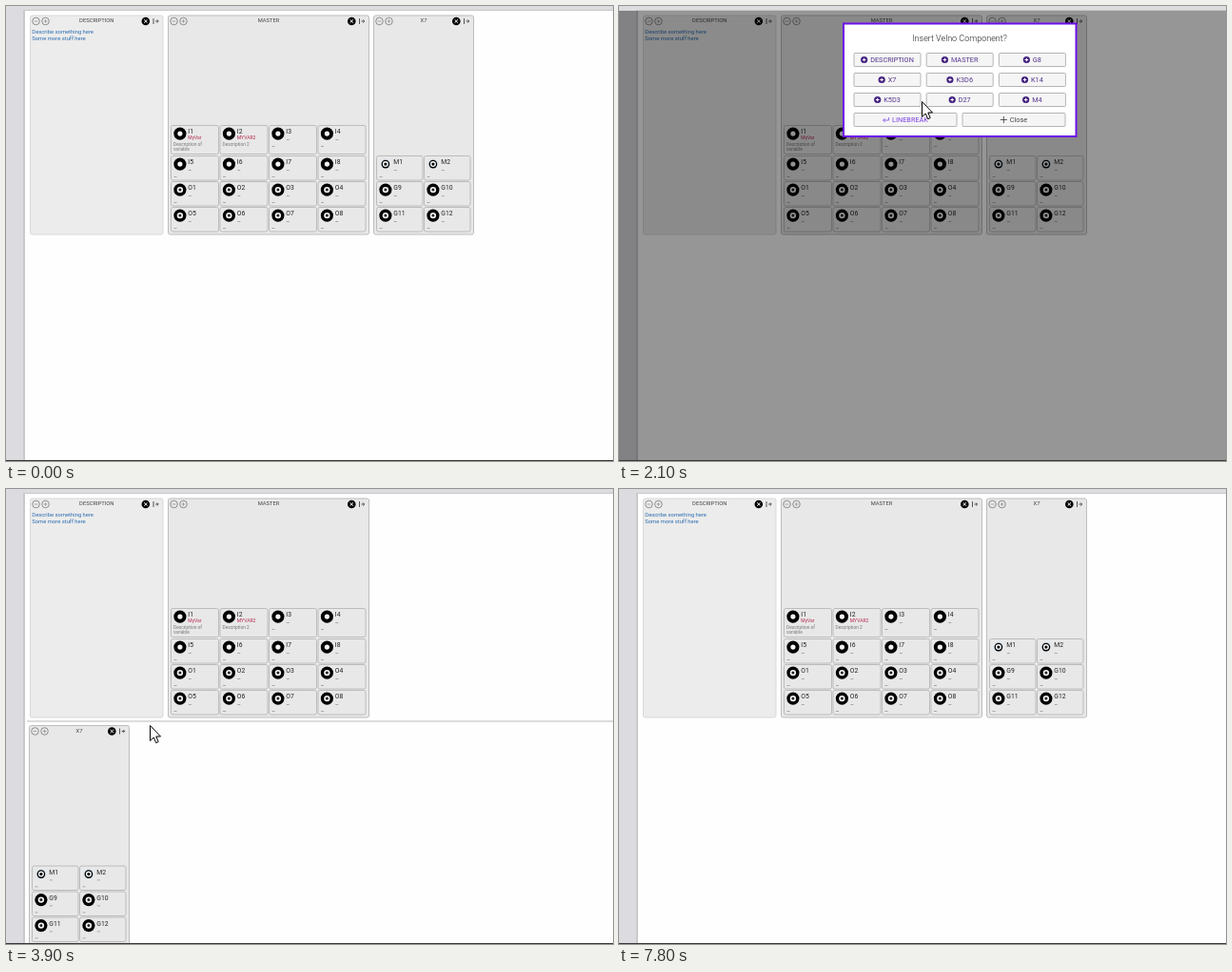
Recreate the animation shown at these times as an HTML page with a canvas. Size 638 px wide and 478 px high, loop 7.9 s.

```html
<!DOCTYPE html>
<html lang="en">
<head>
<meta charset="utf-8">
<title>Module layout editor</title>
<style>
html, body { margin: 0; width: 100%; height: 100%; overflow: hidden; background: #fff; }
canvas { display: block; }
</style>
</head>
<body>
<canvas id="stage" width="638" height="478"></canvas>
<script>
const ctx = document.getElementById('stage').getContext('2d');
const LOOP = 7900, STEP = 100;
const OPEN = 1200, SPLIT = 3200, JOIN = 6400;
const FONT = 'Roboto, "Open Sans", sans-serif';
const clamp = v => Math.max(0, Math.min(1, v));
const easeOut = k => 1 - (1 - k) ** 2;

// Pointer moves, each from where the last one ended
const moves = [
  { start: 100, end: 500, x: 369, y: 16 },
  { start: 600, end: 800, x: 374, y: 17 },
  { start: 1500, end: 2600, x: 304, y: 121 },
  { start: 3400, end: 3900, x: 151, y: 248 },
  { start: 3900, end: 4200, x: 85, y: 313 },
  { start: 4300, end: 5200, x: 417, y: 246 },
  { start: 6650, end: 6900, x: 582, y: 250 },
  { start: 6900, end: 7100, x: 628, y: 183 }
];

function pointerAt(t) {
  if (t < moves[0].start || t > moves[moves.length - 1].end) return null;
  let x = 609, y = 45;
  for (const m of moves) {
    const k = easeOut(clamp((t - m.start) / (m.end - m.start)));
    x += (m.x - x) * k;
    y += (m.y - y) * k;
  }
  return [Math.round(x), Math.round(y)];
}

function rect(x, y, w, h, color) {
  ctx.fillStyle = color;
  ctx.fillRect(x, y, w, h);
}

function box(x, y, w, h, fill, stroke, r = 2, line = 1) {
  ctx.beginPath();
  ctx.roundRect(x + line / 2, y + line / 2, w - line, h - line, r);
  ctx.fillStyle = fill;
  ctx.fill();
  ctx.strokeStyle = stroke;
  ctx.lineWidth = line;
  ctx.stroke();
}

function disc(x, y, r, color) {
  ctx.beginPath();
  ctx.arc(x, y, r, 0, Math.PI * 2);
  ctx.fillStyle = color;
  ctx.fill();
}

function ring(x, y, r, color, width) {
  ctx.beginPath();
  ctx.arc(x, y, r, 0, Math.PI * 2);
  ctx.strokeStyle = color;
  ctx.lineWidth = width;
  ctx.stroke();
}

// Each stroke is a flat list of x, y pairs
function lines(color, width, ...strokes) {
  ctx.beginPath();
  for (const s of strokes)
    for (let i = 0; i < s.length; i += 2) ctx[i ? 'lineTo' : 'moveTo'](s[i], s[i + 1]);
  ctx.strokeStyle = color;
  ctx.lineWidth = width;
  ctx.stroke();
}

function plus(x, y, r, color, width) {
  lines(color, width, [x - r, y, x + r, y], [x, y - r, x, y + r]);
}

function text(str, x, y, size, color, align = 'left', weight = 400) {
  ctx.font = `${weight} ${size}px ${FONT}`;
  ctx.textAlign = align;
  ctx.fillStyle = color;
  ctx.fillText(str, x, y);
}

function panel(x, y, w, title, fill, border) {
  box(x, y, w, 231, fill, border);
  const cy = y + 6.5, right = x + w;
  for (const cx of [x + 6.5, x + 16.5]) ring(cx, cy, 3.8, '#777', .8);
  lines('#888', .7, [x + 4.7, cy, x + 8.3, cy]);
  plus(x + 16.5, cy, 1.8, '#888', .7);
  text(title, x + w / 2, y + 7.6, 5.8, '#444', 'center');
  const cx = right - 18.7, d = 1.7;
  disc(cx, cy, 4.3, '#000');
  lines('#fff', 1, [cx - d, cy - d, cx + d, cy + d], [cx + d, cy - d, cx - d, cy + d]);
  const ax = right - 10.5;
  lines('#444', .9, [ax, cy - 3, ax, cy + 3], [ax + 2, cy, ax + 5, cy],
    [ax + 3.7, cy - 1.6, ax + 5.3, cy, ax + 3.7, cy + 1.6]);
}

function jack(kind, x, y) {
  if (kind === 'M') {
    disc(x, y, 5, '#c9dcec');
    disc(x, y, 4.3, '#000');
    disc(x, y, 3, '#fff');
    disc(x, y, 1.6, '#000');
    return;
  }
  disc(x, y, 6.6, '#000');
  disc(x, y, kind === 'I' ? 2.6 : 3.2, '#f4f4f4');
  if (kind !== 'I') disc(x, y, 1.5, '#222');
}

function cell(x, y, w, h, label, name, notes) {
  box(x, y, w, h, '#e8e8e8', '#bcbcbc');
  jack(label[0], x + 9.9, y + 9.1);
  text(label, x + 18.3, y + 9, 6.8, '#222');
  if (name) {
    text(name, x + 18.3, y + 15, 5, '#b52a50');
    notes.forEach((s, i) => text(s, x + 3, y + 22 + i * 5, 4.8, '#777'));
  } else {
    rect(x + 18.8, y + 15, 3, .8, '#999');
    rect(x + 3.5, y + 22, 3, .8, '#999');
  }
}

const rowY = r => r ? 130 + r * 27 : 125;

function master() {
  panel(170, 9.5, 212, 'MASTER', '#e8e8e8', '#bdbdbd');
  const named = { I1: ['MyVar', ['Description of', 'variable']], I2: ['MYVAR2', ['Description 2']] };
  for (let i = 0; i < 16; i++) {
    const label = (i < 8 ? 'I' : 'O') + (i % 8 + 1), row = i >> 2;
    cell(173 + (i % 4) * 51.5, rowY(row), 51, row ? 26.5 : 31, label, ...(named[label] || []));
  }
}

function x7(dx, dy) {
  ctx.save();
  ctx.translate(dx, dy);
  panel(386, 9.5, 106, 'X7', '#e8e8e8', '#bdbdbd');
  for (let i = 0; i < 6; i++) {
    const label = i < 2 ? 'M' + (i + 1) : 'G' + (i + 7);
    cell(389 + (i % 2) * 50, rowY(1 + (i >> 1)), 49.5, 26.5, label);
  }
  ctx.restore();
}

function page(t) {
  rect(0, 0, 638, 478, '#dcdce0');
  rect(18, 4, 620, 474, '#c9c9c9');
  rect(20, 5, 618, 473, '#fefefe');
  panel(25, 9.5, 140.5, 'DESCRIPTION', '#ececec', '#d9d9d9');
  text('Describe something here', 27.3, 29, 5.85, '#2a6cb0');
  text('Some more stuff here', 27.3, 36, 5.85, '#2a6cb0');
  master();
  const split = t >= SPLIT && t < JOIN;
  if (split) rect(22, 243, 616, 2, t >= 5600 ? '#c4c4c4' : '#dcdcdc');
  x7(split ? -362 : 0, split ? 238.5 : 0);
}

function button(x, row, w, label, color, icon) {
  const y = 49 + row * 21, h = 15;
  box(x, y, w, h, '#f5f5f5', '#b4b4b4', 1);
  ctx.font = `400 7.3px ${FONT}`;
  const left = x + (w - ctx.measureText(label).width - 10) / 2, cy = y + h / 2;
  icon(left + 3.5, cy);
  text(label, left + 10, cy + 2.7, 7.3, color);
}

function addIcon(x, y) {
  disc(x, y, 3.6, '#43207f');
  plus(x, y, 1.8, '#fff', 1);
}

function closeIcon(x, y) {
  plus(x, y, 3.5, '#444', .9);
}

function enterIcon(x, y) {
  lines('#8a58e8', .9, [x + 3, y - 2.5, x + 3, y + .5, x - 3, y + .5],
    [x - 1, y - 1.5, x - 3, y + .5, x - 1, y + 2.5]);
}

function dialog() {
  box(235, 17.5, 246.5, 120.5, '#fff', '#6d10ea', 0, 2);
  text('Insert Velno Component?', 358, 37.2, 9, '#222', 'center', 300);
  ['DESCRIPTION', 'MASTER', 'G8', 'X7', 'K3D6', 'K14', 'K5D3', 'D27', 'M4'].forEach((label, i) =>
    button(246.5 + (i % 3) * 76.2, Math.floor(i / 3), 71, label, '#51348c', addIcon));
  button(246.5, 3, 109, 'LINEBREAK', '#7b3fe4', enterIcon);
  button(360.5, 3, 109, 'Close', '#444', closeIcon);
}

function modal(t) {
  const a = Math.min(clamp((t - OPEN) / 220), clamp((SPLIT + 170 - t) / 220));
  if (!a) return;
  rect(0, 5, 638, 472, `rgba(0,0,0,${.41 * a})`);
  ctx.globalAlpha = a;
  dialog();
  ctx.globalAlpha = 1;
}

const arrow = new Path2D('M.5 .5V16.5L4.2 13L6.7 18.7L9.2 17.6L6.8 12H11.5Z');
const hand = new Path2D('M-1.8 13V2Q-1.8 0 0 0T1.8 2V8Q2.5 6.7 4 7.2T5 9' +
  'Q6 7.8 7.2 8.4T8 10Q9.5 9.2 10.4 10.5V16Q10.4 19 8.5 21V24H-.5V21.5' +
  'L-5.5 15.5Q-6.3 14-5.2 13T-3 13.2L-1.8 14.5Z');

function pointer(t) {
  const at = pointerAt(t);
  if (!at) return;
  const pointing = (t >= 500 && t <= OPEN) || (t >= 5200 && t < JOIN);
  const shape = pointing ? hand : arrow;
  ctx.save();
  ctx.translate(...at);
  if (pointing) ctx.translate(1, -2);
  ctx.fillStyle = '#fff';
  ctx.fill(shape);
  ctx.strokeStyle = '#000';
  ctx.lineWidth = 1;
  ctx.lineJoin = 'round';
  ctx.stroke(shape);
  if (pointing) lines('#000', .8, [1.8, 8, 1.8, 12], [5, 9, 5, 12.5], [8, 10, 8, 13]);
  ctx.restore();
}

function draw(now) {
  const t = Math.floor(now % LOOP / STEP) * STEP;
  page(t);
  modal(t);
  rect(0, 477, 638, 1, '#383838');
  pointer(t);
}

const start = performance.now();
function tick() {
  draw(performance.now() - start);
  requestAnimationFrame(tick);
}
tick();
</script>
</body>
</html>
```
